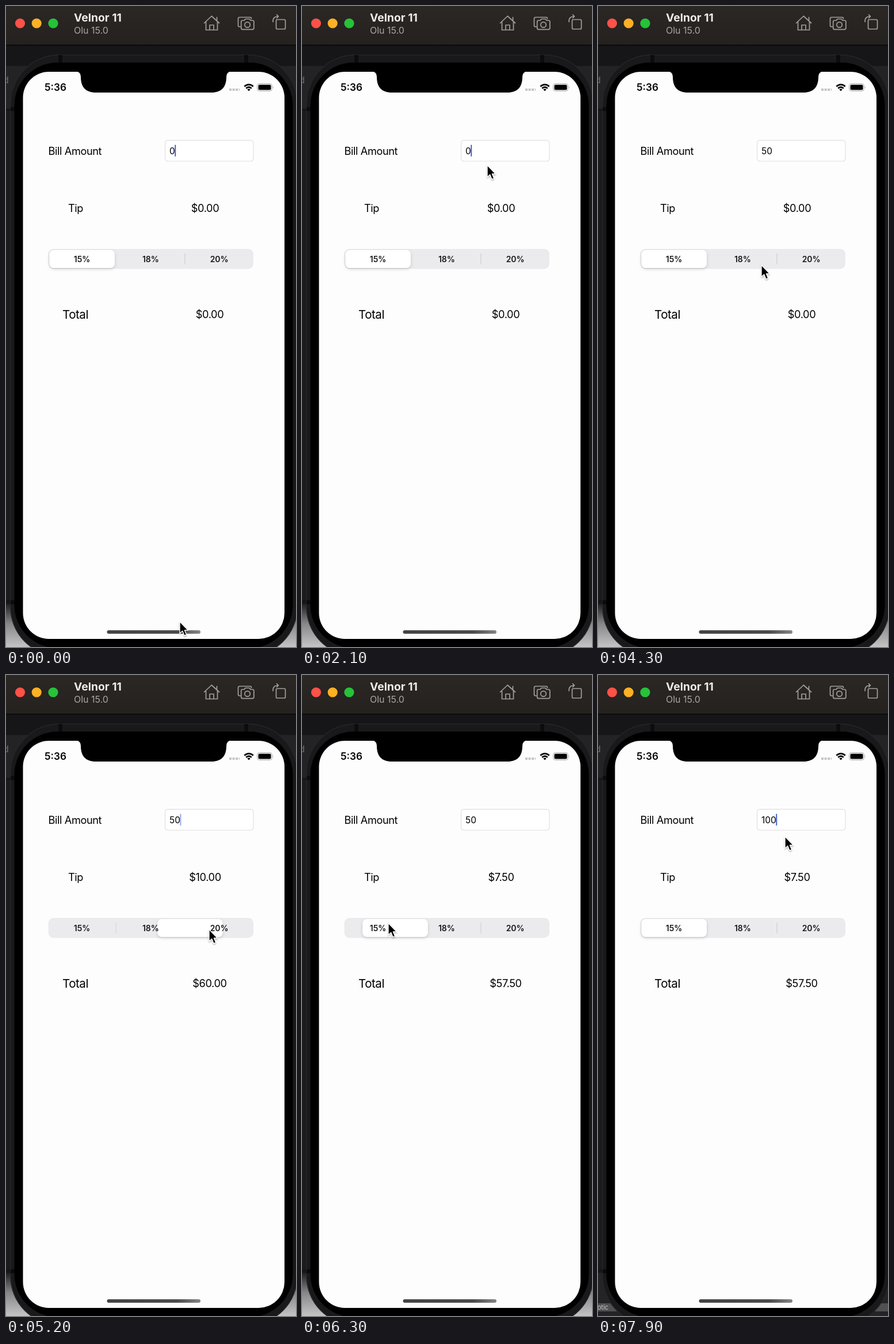
Animation, 504 px wide and 1111 px high, one loop 8 s. Source, as an HTML page:

```html
<!DOCTYPE html>
<html lang="en">
<head>
<meta charset="utf-8">
<title>Tip calculator</title>
<style>
  html, body { margin: 0; width: 100%; height: 100%; overflow: hidden; background: #161517; }
  svg { display: block; width: 504px; height: 1111px; font-family: Inter, "Liberation Sans", sans-serif; }
  .label { font-size: 18.2px; letter-spacing: -.4px; }
  .mid { text-anchor: middle; }
  .segment { font-size: 14px; font-weight: 600; letter-spacing: -.1px; fill: #171719; }
  .icon { fill: none; stroke: #a29f9c; stroke-width: 1.7; stroke-linejoin: round; stroke-linecap: round; }
</style>
</head>
<body>
<svg viewBox="0 0 504 1111">
  <defs>
    <linearGradient id="bar" x2="0" y2="1">
      <stop stop-color="#2a2725"/><stop offset="1" stop-color="#24211f"/>
    </linearGradient>
    <linearGradient id="corner" x2="0" y2="1">
      <stop stop-color="#1e1d20"/><stop offset=".45" stop-color="#858587"/><stop offset="1" stop-color="#c4c4c5"/>
    </linearGradient>
    <linearGradient id="home">
      <stop stop-color="#444"/><stop offset=".75" stop-color="#4a4a4a"/><stop offset="1" stop-color="#858585"/>
    </linearGradient>
    <filter id="soft" x="-20%" y="-40%" width="140%" height="190%">
      <feDropShadow dx="0" dy="2" stdDeviation="2.5" flood-opacity=".17"/>
    </filter>
    <filter id="drop" x="-50%" y="-30%" width="200%" height="170%">
      <feDropShadow dx="0" dy="1.5" stdDeviation="1.3" flood-opacity=".35"/>
    </filter>
  </defs>

  <!-- desktop behind the device -->
  <rect width="504" height="1111" fill="#161517"/>
  <rect y="104" width="504" height="74" fill="#232225"/>
  <rect y="182" width="504" height="848" fill="#1b1a1d"/>
  <rect y="1036" width="504" height="75" fill="url(#corner)"/>
  <text x="-5" y="134" font-size="16" fill="#6e6d70">d</text>
  <g id="note">
    <rect y="1036" width="504" height="75" fill="#242326"/>
    <rect y="1089" width="504" height="14" fill="#515053"/>
    <text x="-1" y="1100" font-size="11" fill="#c8c7c9">otic</text>
  </g>

  <!-- device -->
  <rect x="8" y="85" width="498" height="1041" rx="84" fill="#19181b" stroke="#262528" stroke-width="1.5"/>
  <path d="M91 85h7v13h-7zM414 85h7v13h-7zM8 175h7v7h-7zM8 1030h7v7h-7z" fill="#0c0b0d"/>
  <rect x="14.5" y="98" width="484" height="1015" rx="75"/>
  <rect x="29.5" y="114" width="454.5" height="983" rx="45" fill="#fefdfe"/>
  <path d="M121 113q9 1 9 10c0 18 9 27 26 27H357c17 0 26-9 26-27q0-9 9-10z"/>

  <!-- window bar -->
  <rect width="504" height="68" fill="url(#bar)"/>
  <rect y="67" width="504" height="1.5" fill="#080808"/>
  <circle cx="24.5" cy="30" r="8.6" fill="#fe5148"/>
  <circle cx="53.2" cy="30" r="8.6" fill="#feb025"/>
  <circle cx="82" cy="30" r="8.6" fill="#26c238"/>
  <text x="118" y="27" font-size="19.3" font-weight="700" fill="#efecea">Velnor 11</text>
  <text x="118" y="47.5" font-size="16" fill="#a9a6a3">Olu 15.0</text>
  <g class="icon">
    <path d="M344.5 29.5 357.3 17.5 370.5 29.5M347.5 28V41.5H367.5V28M366.5 25V19.5M354 41V33H361V41"/>
    <path d="M407.5 36H406q-2.500 0-2.500-2.500V22q0-2.500 2.500-2.500H424q2.500 0 2.500 2.500"/>
    <path d="M411 25H414L416 22.500H423L425 25H428.500q2.300 0 2.300 2.300V38.300q0 2.300-2.300 2.300H411q-2.300 0-2.300-2.300V27.300q0-2.300 2.300-2.300z"/>
    <circle cx="419.500" cy="32.500" r="4.700"/>
    <rect x="469.500" y="23.500" width="16" height="16.500" rx="2"/>
    <path d="M464 27.500q-.5-9.500 9-9.500M470.500 15 473.500 18 470.500 21"/>
  </g>

  <!-- status bar -->
  <text x="67" y="147" font-size="17.2" font-weight="600">5:36</text>
  <path d="M390 145h18" stroke="#c4c3c6" stroke-width="4" stroke-dasharray="4 1.600" transform="translate(-2)"/>
  <g fill="none" stroke="#000" stroke-width="2.500">
    <path d="M414.300 139.500q7.700-6.800 15.400 0M417.200 142.700q4.800-4.200 9.600 0"/>
  </g>
  <path d="M422 147.500l-2.700-2.800q2.700-2.200 5.400 0z"/>
  <rect x="436.700" y="134.700" width="25.600" height="12.600" rx="3.600" fill="none" stroke="#a3a2a5"/>
  <rect x="438.500" y="136.500" width="22" height="9" rx="2"/>
  <path d="M464 139q1.800 2 0 4z" fill="#a3a2a5"/>

  <!-- form -->
  <text class="label" x="73.500" y="258">Bill Amount</text>
  <rect x="276.500" y="232.700" width="153.500" height="36.300" rx="5" fill="#fff" stroke="#dfdee4" stroke-width="1.200"/>
  <text id="amount" x="284" y="256.700" font-size="15.400"></text>
  <rect id="caret" y="240.500" width="2" height="20.500" rx="1" fill="#4361d1"/>
  <text class="label" x="108" y="357">Tip</text>
  <text class="label mid" id="tip" x="346" y="357"></text>

  <rect x="73.500" y="421" width="356.500" height="34.700" rx="9" fill="#ebeaec"/>
  <rect id="dividerA" x="190.700" y="429" width="1.200" height="19" fill="#cfced3"/>
  <rect id="dividerB" x="310.300" y="429" width="1.200" height="19" fill="#cfced3"/>
  <rect id="thumb" y="423" width="113.500" height="31" rx="7.500" fill="#fff" filter="url(#soft)"/>
  <g class="segment mid">
    <text x="132" y="443.500">15%</text>
    <text x="251.300" y="443.500">18%</text>
    <text x="370.600" y="443.500">20%</text>
  </g>

  <text x="98" y="541.700" font-size="20.600" letter-spacing="-.5">Total</text>
  <text class="label mid" id="total" x="354" y="541"></text>
  <rect x="175.500" y="1082" width="162.500" height="6" rx="3" fill="url(#home)"/>

  <path id="cursor" d="M0 0V20.500L4.700 16.300 8 24.300 11.700 22.700 8.400 15H14.500Z"
        stroke="#fff" stroke-width="1.300" stroke-linejoin="round" filter="url(#drop)"/>
</svg>
<script>
const LOOP = 8000, STEP = 100, SLIDE = 400;
const el = id => document.getElementById(id);
const set = (id, name, value) => el(id).setAttribute(name, value);

// time, x, y of the pointer tip
const path = [
  [0, 302, 1067], [200, 302, 863], [300, 302, 863], [600, 312, 240], [700, 312, 240],
  [900, 377, 217], [1500, 352, 252], [2100, 322, 276], [3500, 322, 280],
  [4200, 284, 449], [4600, 284, 449], [5000, 353, 441], [5300, 353, 441],
  [6000, 150, 430], [6500, 150, 430], [7100, 325, 280], [LOOP, 325, 280]
];
const typing = [
  [0, "0"], [2900, ""], [3100, "5"], [3300, "50"],
  [7200, "5"], [7300, ""], [7500, "1"], [7600, "10"], [7800, "100"]
];
// time, segment, rate
const taps = [[0, 0, 0], [4400, 1, .18], [5100, 2, .20], [6100, 0, .15]];

const lastIndex = (list, t) => list.findLastIndex(item => item[0] <= t);
const smooth = p => p * p * (3 - 2 * p);
const mix = (a, b, p) => a + (b - a) * p;
const money = value => "$" + value.toFixed(2);

function pointer(t) {
  const i = Math.min(lastIndex(path, t), path.length - 2);
  const [t0, x0, y0] = path[i], [t1, x1, y1] = path[i + 1];
  const p = smooth((t - t0) / (t1 - t0));
  return [mix(x0, x1, p), mix(y0, y1, p)];
}

function caretOpacity(t) {
  if ((t >= 2900 && t < 3900) || t >= 7200) return 1;
  const phase = (t + (t < 2900 ? 0 : 350)) % 1000;
  if (phase >= 600 && phase < 800) return 0;
  return phase >= 500 && phase < 900 ? .55 : 1;
}

function draw(t) {
  const [x, y] = pointer(t);
  set("cursor", "transform", `translate(${x} ${y})`);

  const amount = el("amount");
  amount.textContent = typing[lastIndex(typing, t)][1];
  set("caret", "x", 284.5 + (amount.textContent ? amount.getComputedTextLength() : 0) - 1);
  set("caret", "opacity", caretOpacity(t));

  const k = lastIndex(taps, t);
  const [start, segment, rate] = taps[k];
  const previous = k ? taps[k - 1][1] : segment;
  const p = 1 - (1 - Math.min((t - start) / SLIDE, 1)) ** 3;
  const fade = target => mix(+(previous === target), +(segment === target), p);
  set("thumb", "x", 75.5 + 119 * mix(previous, segment, p));
  set("dividerA", "opacity", fade(2));
  set("dividerB", "opacity", fade(0));

  const bill = k ? 50 : 0;
  el("tip").textContent = money(bill * rate);
  el("total").textContent = money(bill * (1 + rate));
  set("note", "visibility", t >= 7600 ? "visible" : "hidden");
}

const begin = performance.now();
function tick() {
  const t = (performance.now() - begin) % LOOP;
  draw(Math.floor(t / STEP) * STEP);
  requestAnimationFrame(tick);
}
tick();
</script>
</body>
</html>
```
